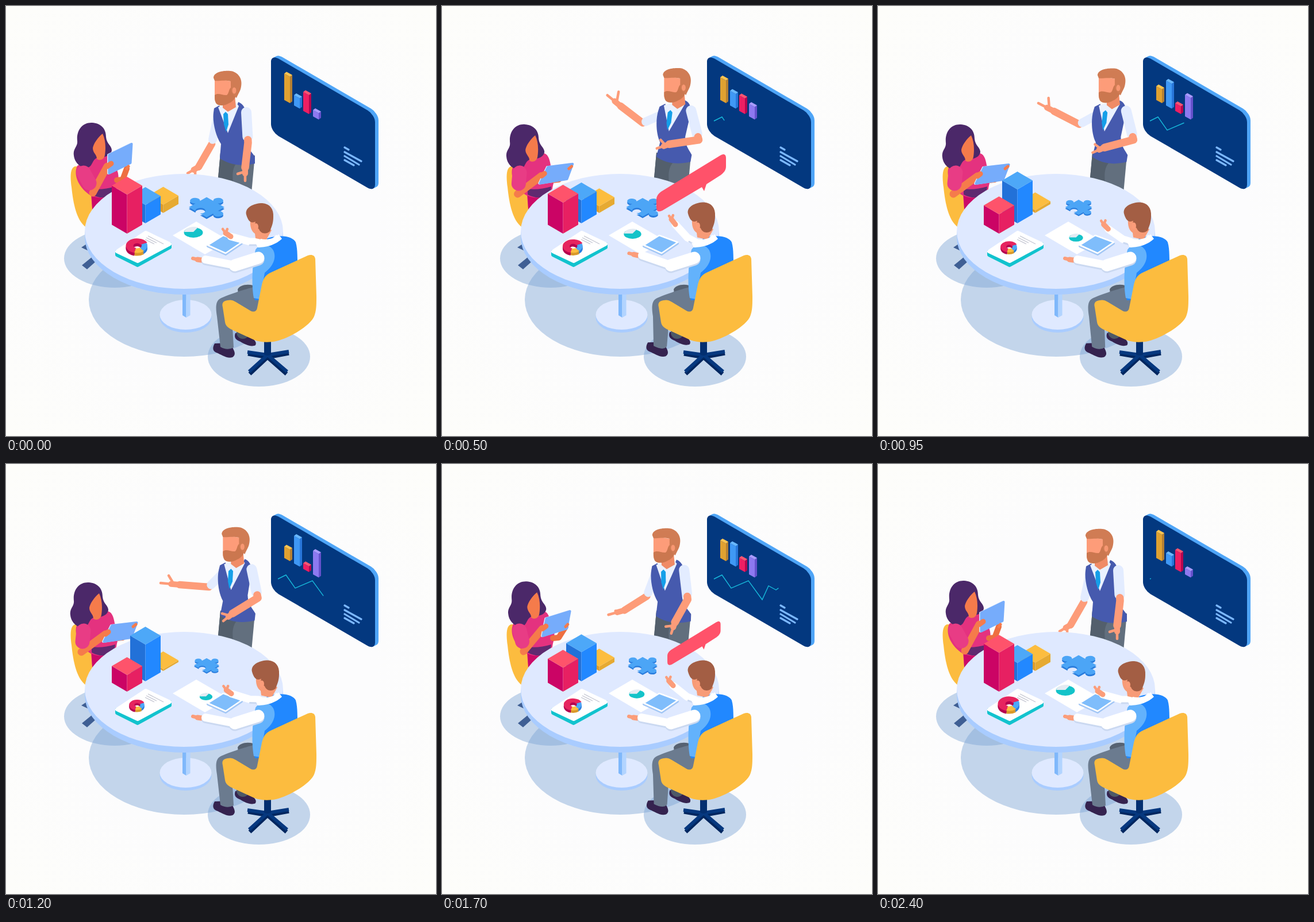
An HTML page for the animation above (2.45 s loop, 748 by 748 pixels).

```html
<!DOCTYPE html>
<html lang="en">
<head>
<meta charset="utf-8">
<title>Team meeting</title>
<style>
html, body { margin: 0; width: 100%; height: 100%; overflow: hidden; background: #fcfcfc; }
svg { display: block; width: 100vw; height: 100vh; }
</style>
</head>
<body>
<svg viewBox="0 0 748 748" xmlns="http://www.w3.org/2000/svg">
  <defs>
    <radialGradient id="paper" cx=".5" cy=".5" r=".7">
      <stop offset=".5" stop-color="#fcfcfd"/><stop offset="1" stop-color="#fdfdfa"/>
    </radialGradient>
    <rect id="panel" width="181" height="134.6" rx="13" transform="matrix(1 .581 0 1 461 84)"/>
  </defs>
  <rect width="748" height="748" fill="url(#paper)"/>

  <g fill="#7ca4d4" fill-opacity=".45">
    <ellipse cx="310" cy="511" rx="166" ry="99"/>
    <ellipse cx="189" cy="439" rx="88" ry="51"/>
    <ellipse cx="440" cy="610" rx="89" ry="52"/>
  </g>

  <!-- wall screen -->
  <g fill="#4fa5f7">
    <use href="#panel" x="6" y="-3"/><use href="#panel" x="4" y="-2"/><use href="#panel" x="2" y="-1"/>
  </g>
  <use href="#panel" fill="#03387f"/>
  <path d="M589 246L596 250M589 254L618 270M589 261L614 276M589 268L605 277" stroke="#7cb8ff" stroke-width="3.2" stroke-linecap="round"/>
  <g id="screen"></g>

  <!-- far chair -->
  <path d="M131 420L140 414L154 421L148 428ZM132 451L154 433L160 441L141 458Z" fill="#3f5f94"/>
  <path d="M120 279C111 282 112 298 114 315C117 345 123 372 138 384L165 385L165 300L126 279Z" fill="#fcbc3f"/>
  <g id="woman"></g>
  <g id="host"></g>

  <!-- table -->
  <ellipse cx="312.5" cy="542" rx="45" ry="26" fill="#a9ccff"/>
  <ellipse cx="312.5" cy="537" rx="45" ry="26" fill="#dfe9ff"/>
  <path d="M307 490H313.500V542L307 538Z" fill="#7fb8fb"/>
  <path d="M313.500 490H320.500V538L313.500 542Z" fill="#b2d4ff"/>
  <path d="M137 392V402A172.500 100 0 0 0 482 402V392Z" fill="#a9ccff"/>
  <ellipse cx="309.5" cy="392" rx="172.500" ry="100" fill="#dfe9ff"/>

  <!-- paper, card and tablet -->
  <path d="M331 375L290 399L346 432L388 408Z" fill="#fff"/>
  <g stroke-width="6" stroke-linejoin="round">
    <path d="M193 427V433L229 451L285 420V414Z" fill="#12c3ce" stroke="#12c3ce"/>
    <path d="M243 394L285 414L229 444L193 427Z" fill="#fff" stroke="#fff"/>
  </g>
  <path d="M247 400L274 414M244 403L262 412M242 406L258 414" stroke="#c3c5d1" stroke-width="1.3"/>
  <g stroke-width="4" stroke-linejoin="round">
    <path d="M351 418L378 401L410 413L382 432Z" fill="#a3c7f5" stroke="#a3c7f5"/>
    <path d="M351 416L378 399L410 411L382 430Z" fill="#7fbdfb" stroke="#fff" stroke-width="2.500"/>
  </g>
  <g id="things"></g>

  <!-- near chair foot -->
  <g fill="none" stroke-linejoin="round">
    <path d="M421 605L455 611L492 604M424 640L455 611L488 640" stroke="#00265f" stroke-width="7"/>
    <path d="M420 602L455 607L492 601M423 636L455 607L489 636" stroke="#06387f" stroke-width="6"/>
  </g>
  <path d="M449 575H461V606Q455 610 449 606Z" fill="#032f70"/>
  <g id="guest"></g>
  <path d="M385 512C378 513 375 517 377 524L381 550C382 557 388 561 395 564L432 581C445 586 460 585 470 583C495 577 530 555 536 540C540 530 540 520 540 505L538 440C537 433 531 432 525 434L462 463C450 468 447 476 445 485L437 525C436 532 430 533 425 530L400 515C394 511 390 511 385 512Z" fill="#fcbc3f"/>
  <g id="bubble"></g>
</svg>
<script>
const LOOP = 2450, STEP = 50, ENCORE = 1400;
const put = (id, html) => { document.getElementById(id).innerHTML = html; };
const mix = (a, b, k) => a + (b - a) * k;
const along = (a, b, k) => [mix(a[0], b[0], k), mix(a[1], b[1], k)];
const path = (d, fill) => `<path d="${d}" fill="${fill}"/>`;
const group = (transform, html) => `<g transform="${transform}">${html}</g>`;
const move = (x, y, html) => group(`translate(${x} ${y})`, html);
const scaleAt = (x, y, s, html) => group(`translate(${x} ${y}) scale(${s}) translate(${-x} ${-y})`, html);
const limb = (pts, w, color) => `<polyline points="${pts.join(' ')}" fill="none" stroke="${color}" stroke-width="${w}" stroke-linecap="round" stroke-linejoin="round"/>`;

// timing: 0..1 ramp, and a rise followed by a fall
const ramp = (t, from, to) => Math.min(1, Math.max(0, (t - from) / (to - from)));
const ease = (t, from, to) => { const s = ramp(t, from, to); return s * s * (3 - 2 * s); };
const pulse = (t, a, b, c, d) => ease(t, a, b) - ease(t, c, d);

// parabola through a (u = 0), b (u = .6) and c (u = 1)
const bend = (u, a, b, c) => a.map((v, i) =>
  v * (.6 - u) * (1 - u) / .6 + b[i] * u * (1 - u) / .24 + c[i] * u * (u - .6) / .4);

function screenBar(x, base, h, [face, side, cap]) {
  const y = base - h;
  return path(`M${x} ${y - 5.5}l10 5.5V${base}l-10 -5.5Z`, face)
    + path(`M${x + 10} ${y}l4 -3V${base - 3}l-4 3Z`, side)
    + path(`M${x} ${y - 5.5}l4 -3l10 5.5l-4 3Z`, cap);
}

function drawScreen(t, p, slow) {
  const shown = pulse(t, 50, 2050, 2100, 2420);
  put('screen',
    screenBar(484, 169, mix(46, 20, slow), ['#e0a131', '#b47f32', '#fdc552'])
    + screenBar(501, 178.5, mix(18, 48, slow), ['#3f98f5', '#2877da', '#69b8ff'])
    + screenBar(517, 188, mix(33, 10, slow), ['#ee1f63', '#b3074f', '#ff5570'])
    + screenBar(534, 197.5, mix(11, 41, p), ['#8d79f0', '#6651cc', '#aa9bff'])
    + `<path d="M473 200L487 193L503 216L533 203L557 236L568 212L581 219L588 214L599 216" pathLength="1" fill="none" stroke="#17b9da" stroke-width="1.4" stroke-dasharray="${shown} 2"/>`);
}

function box(x, base, h, [left, right, top]) {
  const w = 26.5, d = 15.5, y = base - h;
  return path(`M${x - w} ${y - d}L${x} ${y}V${base}L${x - w} ${base - d}Z`, left)
    + path(`M${x + w} ${y - d}L${x} ${y}V${base}L${x + w} ${base - d}Z`, right)
    + path(`M${x - w} ${y - d}L${x} ${y - 2 * d}L${x + w} ${y - d}L${x} ${y}Z`, top);
}

function arc(r, from, to, w, color) {
  const at = a => [r * Math.cos(a * Math.PI / 180), r * Math.sin(a * Math.PI / 180)];
  return `<path d="M${at(from)}A${r} ${r} 0 ${to - from > 180 ? 1 : 0} 1 ${at(to)}" fill="none" stroke="${color}" stroke-width="${w}"/>`;
}
const ring = (red, blue, gold) => arc(13, 105, 335, 13, red) + arc(13, 335, 410, 10, blue) + arc(13, 50, 105, 12, gold);

// square with three knobs and one notch, laid flat
const PUZZLE = 'M-10 -10H-2.6A4 4 0 1 1 2.6 -10H10V-2.6A4 4 0 1 1 10 2.6V10H2.6A4 4 0 1 0 -2.6 10H-10V2.6A4 4 0 1 1 -10 -2.6Z';
const puzzle = (y, color) => group(`matrix(1.55 .87 -1.55 .87 349 ${y})`, path(PUZZLE, color));

function drawThings(p, slow) {
  const shrink = mix(1, .71, slow);
  put('things',
    box(273.5, 360, mix(14.5, 3, slow), ['#dd9c2b', '#e6aa32', '#fcbd3f'])
    + box(242.5, 378, mix(32, 64, slow), ['#2271d8', '#2288ff', '#4da8f8'])
    + box(210.5, 396, mix(68, 29, p), ['#cb0465', '#e72062', '#fe536b'])
    + scaleAt(349, 350.5, shrink, puzzle(353, '#2a7ddd') + puzzle(350, '#4ca5f6'))
    + move(mix(326, 348, slow), mix(394, 405, slow), group(`scale(${mix(1, .68, slow)})`,
      '<ellipse rx="16.5" ry="9" fill="#14c3c9"/>' + path('M0 -1L-16 -1C-14 -8 -3 -12 8 -9Z', '#e3ebf3')))
    + move(228, mix(417, 419, p), group(`scale(${shrink} ${shrink * .65})`,
      [8, 4].map(y => move(0, y, ring('#b5034f', '#2a7fe0', '#d9992a'))).join('') + ring('#e6255f', '#4da8f8', '#fcbd3f'))));
}

function drawWoman(q) {
  const skin = '#f57b4b', hair = '#4b2869', pink = '#e4327f';
  const at = (a, b) => along(a, b, q);
  const elbow = at([151, 325], [131, 327]), hand = at([176, 279], [173, 296]), palm = at([210, 283], [221, 283]);
  const slate = [at([179, 259], [184, 281]), at([218, 240], [227, 276]), at([216, 273], [217, 302]), at([179, 291], [170, 309])];
  const tablet = (dx, color) => move(dx, 0, `<polygon points="${slate.join(' ')}" fill="${color}" stroke="${color}" stroke-width="4" stroke-linejoin="round"/>`);
  const head =
    path('M150 203C134 202 122 215 124 235C125 245 116 248 118 260C119 272 130 283 142 281C152 279 148 266 162 263C172 264 183 260 184 251C184 243 175 240 174 228C174 212 164 204 150 203Z', hair)
    + path('M168 222C160 228 152 240 151 247C151 256 158 258 158 266C163 270 171 267 172 259C174 246 173 232 168 222Z', skin);
  put('woman',
    path('M124 278C140 268 158 262 172 256C183 254 187 264 189 277C197 290 197 300 193 312L186 350L150 352L148 330C128 318 116 295 124 278Z', pink)
    + path('M149 330C162 336 176 334 188 328V360L150 354Z', '#cb0a68')
    + path('M149 318C162 320 176 318 190 314L188 328C174 336 160 334 149 328Z', '#5f2a70')
    + limb([[193, 303], [203, 302], palm], 10, '#ee6f40')
    + move(-6 * q, 3 * q, head)
    + limb([elbow, hand], 13, skin)
    + limb([[135, 290], at([145, 308], [133, 309])], 25, '#e83c85')
    + tablet(-1, '#d6e7ff') + tablet(.5, '#76acfb')
    + limb([hand, at([183, 274], [178, 292])], 9, skin)
    + limb([palm, at([213, 279], [226, 279])], 5, skin));
}

function drawHost(u) {
  const skin = '#fd9c79', cloth = '#e3ecff', hip = 270, k = .184 * u;
  const lean = (x, y) => [x + k * (hip - y), y - 3 * u];
  const at = (a, b, c) => bend(u, a, b, c);
  const ls = lean(368, 192), rs = lean(418, 185);
  const le = at([358, 240], [353, 214], [349, 203]), lw = at([335, 280], [302, 210], [312, 172]);
  const lf = at([316, 291], [269, 207], [290, 152]), lt = at([329, 293], [283, 194], [310, 147]);
  const re = at([421, 238], [438, 233], [447, 233]), rw = at([416, 281], [394, 260], [396, 239]);
  const rf = at([416, 304], [378, 273], [374, 246]), rt = at([403, 292], [376, 260], [381, 231]);
  const palm = (w, f, t) => limb([w, along(w, f, .45)], 10, skin)
    + limb([along(w, f, .4), f], 4.5, skin) + limb([along(w, f, .3), t], 4.5, skin);
  const head =
    path('M377 160L398 155L400 176L386 184L377 177Z', '#f08b66')
    + path('M363 126V158C362 168 368 172 380 172L396 162V132Z', skin)
    + path('M363 155C369 150 377 156 384 155C388 152 387 146 391 142L402 148C401 158 396 166 388 169C380 174 370 174 366 170C363 166 363 160 363 155Z', '#cb774f')
    + path('M361 125C361 115 378 112 390 113C403 114 412 126 409 140C408 148 404 152 401 160L395 154L391 148V131C380 128 370 131 363 130Z', '#d07c54')
    + '<ellipse cx="397" cy="147" rx="3.5" ry="5.5" fill="#f79772"/>';
  const torso =
    path('M362 178L371 173L386 216L404 167C413 170 418 180 418 190L416 230C418 245 426 252 433 262V274C410 280 388 276 372 265L374 240C364 225 359 200 361 185Z', '#465aae')
    + path('M369 176L398 166L405 174L386 221Z', '#eaf1ff')
    + path('M378 188L382 184L386 188L387 206L383 219L379 206Z', '#159fe9');
  const [hx, hy] = lean(385, 140);
  put('host',
    path('M373 255L433 260L427 325L368 310Z', '#626f7e')
    + path('M373 255L402 272C392 284 394 296 396 316L368 310Z', '#535f6c')
    + limb([le, lw], 12.5, skin) + palm(lw, lf, lt)
    + limb([ls, along(ls, le, .84)], 15, cloth)
    + group(`matrix(1 0 ${-k} 1 ${k * hip} ${-3 * u})`, torso)
    + move(hx - 385, hy - 140 - 2 * u, head)
    + limb([rs, along(rs, re, .8)], 18, cloth)
    + limb([along(rs, re, .9), re, rw], 13.5, skin) + palm(rw, rf, rt));
}

function drawGuest(t, p) {
  const settle = 1 - ease(t, 2050, 2400);
  const wave = s => pulse(s, 0, 450, 700, 1300);
  const lift = Math.max(wave(t), wave(t - ENCORE)) * settle;
  const look = ease(t, 0, 500) * settle;
  const reach = pulse(t, 50, 300, 350, 600);
  const foot = Math.sin(Math.PI * p) ** 2, fx = -6 * foot, fy = -2 * foot;
  const skin = '#fb9d7a', shoe = '#35234f', shade = '#cbd9f1';
  const hand = along([382, 395], [399, 371], lift), wrist = along([391, 401], [406, 380], lift);
  const cuff = along([347, 443], [350, 422], reach), palm = along([333, 441], [334, 416], reach);
  const shoulder = [439, 440], elbow = [398, 453];
  const sleeve = color => limb([shoulder, elbow], 21, color) + limb([elbow, cuff], 14, color);
  const head =
    path('M425 372C424 384 427 392 433 396L434 404L452 408L462 390L440 372Z', '#f79b77')
    + path('M418 363C415 351 430 343 446 343C459 344 466 353 465 367C465 378 462 384 459 392C452 398 443 396 440 388C436 386 432 380 434 375C428 378 422 377 418 363Z', '#a35e44')
    + `<ellipse cx="435" cy="384" rx="4" ry="6" fill="${skin}"/>`;
  put('guest',
    move(fx * .6, fy, path('M399 569C396 577 400 581 408 584C416 589 427 594 434 590C437 584 431 580 424 574L420 566Z', shoe))
    + limb([[412, 550], [412 + fx * .6, 568]], 22, '#4d5968')
    + path('M403 493C406 486 418 483 430 486V502L404 500Z', '#566272')
    + move(fx, fy, path('M363 587C359 594 359 600 366 603C374 606 384 614 394 611C400 607 398 602 395 596L390 586Z', shoe))
    + path(`M434 488C415 493 380 504 371 510C364 515 365 528 367 540L${373 + fx} ${593 + fy}Q385 600 ${396 + fx} ${594 + fy}L394 558H440V495Z`, '#6b7b8f')
    + limb([[440, 410], along([424, 410], [427, 403], lift), wrist], 13, '#fff')
    + limb([[440, 416], along([424, 416], [430, 410], lift)], 3, shade)
    + limb([wrist, hand], 9, skin)
    + limb([along([377, 388], [395, 365], lift), hand, along([385, 388], [402, 364], lift)], 4.5, skin)
    + path('M455 404C480 396 500 402 504 411C508 425 506 440 508 455L450 510L433 512C427 485 428 450 436 422Z', '#2188ff')
    + path('M434 424C442 412 458 413 465 425C472 440 462 455 450 464L442 510L431 508C427 485 428 450 434 424Z', '#63b2fc')
    + path('M434 412C445 414 462 408 470 398L479 405C470 416 450 420 438 420Z', '#fff')
    + move(10 * look, -1.5 * look, head)
    + path('M443 405C455 408 468 404 474 397L480 405C468 415 452 418 440 415Z', '#fff')
    + limb([cuff, palm], 9, skin) + limb([palm, [palm[0] - 8, palm[1] - 2]], 6, skin)
    + move(0, 1, sleeve(shade)) + move(0, -2, sleeve('#fff')));
}

const BUBBLE = 'M373 337C373 331 376 327 381 323L484 260C490 256 494 258 494 264V279C494 286 490 290 485 294L460 310L456 322L452 315L383 356C376 359 373 357 373 350Z';

function drawBubble(t) {
  const pop = s => pulse(s, 50, 415, 585, 950);
  put('bubble', scaleAt(454, 325, pop(t) + pop(t - ENCORE), path(BUBBLE, '#ff526a')));
}

function draw(t) {
  const p = (1 - Math.cos(2 * Math.PI * t / LOOP)) / 2, slow = p ** 1.35;
  drawScreen(t, p, slow);
  drawThings(p, slow);
  drawWoman(pulse(t, 0, 560, 1300, 2050));
  drawHost(ease(t, 0, 550) * (1 - ramp(t, 850, 2400)) ** 2);
  drawGuest(t, p);
  drawBubble(t);
}

let start = null, shown = -1;
function tick(now) {
  if (start === null) start = now;
  const t = Math.floor(((now - start) % LOOP) / STEP) * STEP;
  if (t !== shown) draw(shown = t);
  requestAnimationFrame(tick);
}
draw(0);
requestAnimationFrame(tick);
</script>
</body>
</html>
```
